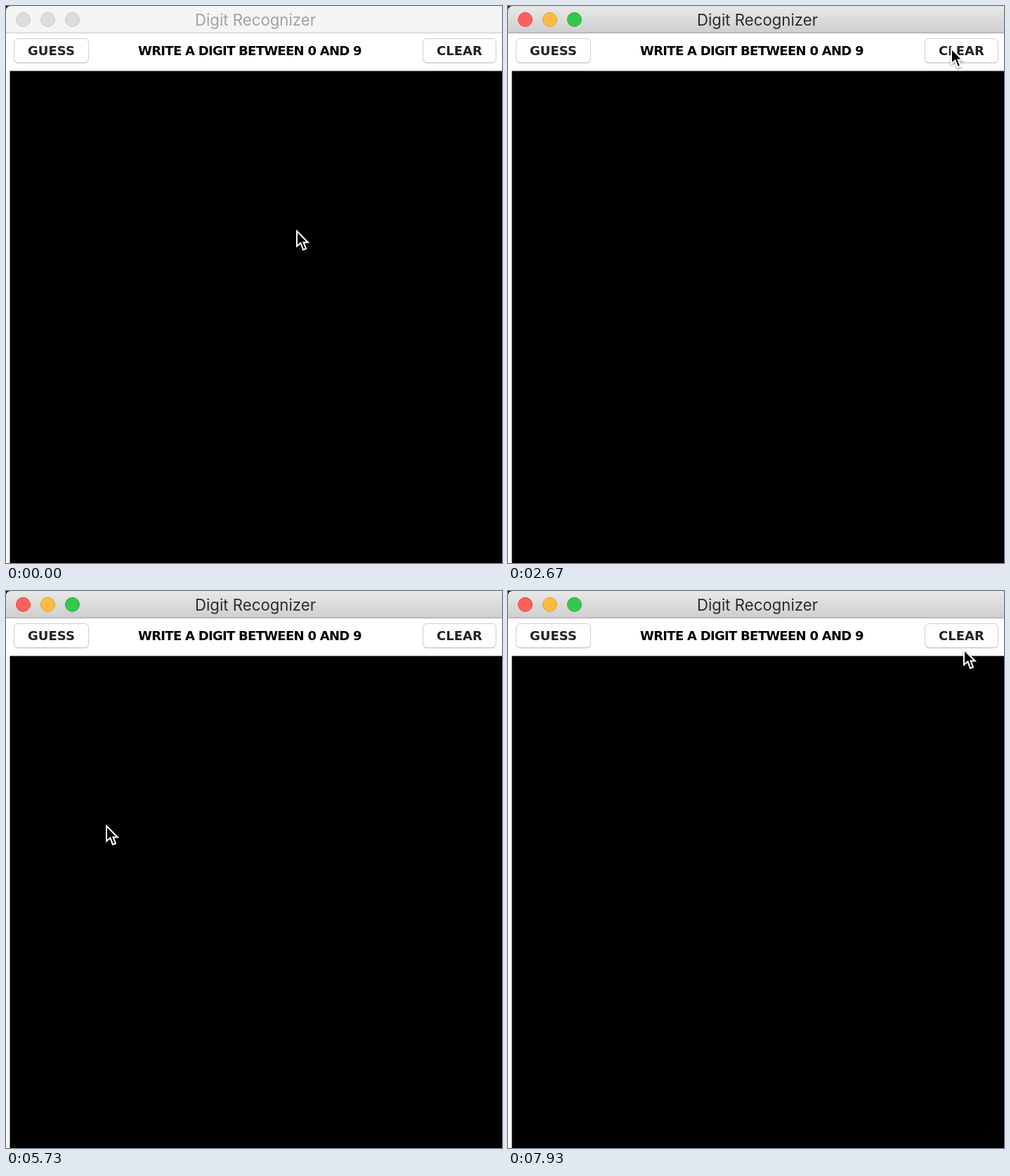
Recreate the animation shown at these times as an HTML page. Size 706 px wide and 793 px high, loop 8 s.

```html
<!DOCTYPE html>
<html lang="en">
<head>
<meta charset="utf-8">
<title>Digit Recognizer</title>
<style>
  html, body { margin: 0; width: 100%; height: 100%; overflow: hidden; background: #fff; }
  svg { display: block; width: 706px; height: 793px; }
  text { text-anchor: middle; }
  .title { font: 22.2px Inter, "Liberation Sans", sans-serif; }
  .bold { font: 700 18px "DejaVu Sans", sans-serif; }
  .tight { letter-spacing: -.72px; }
  .ink { fill: none; stroke: #fff; stroke-width: 26; stroke-linecap: round; stroke-linejoin: round; }
</style>
</head>
<body>
<svg viewBox="0 0 706 793">
  <defs>
    <linearGradient id="bar" x2="0" y2="1">
      <stop stop-color="#e8e8e8"/>
      <stop offset="1" stop-color="#cfcfcf"/>
    </linearGradient>
    <filter id="shade" x="-50%" y="-50%" width="200%" height="200%">
      <feDropShadow dx="0" dy="2" stdDeviation="1.5" flood-opacity=".4"/>
    </filter>
  </defs>
  <rect width="706" height="793" fill="#fff"/>
  <rect width="8" height="8" fill="#111"/>
  <path id="head" d="M0 38V7Q0 0 7 0H706V38Z"/>
  <rect id="rule" y="37.5" width="706" height="1.5"/>
  <g id="lights"></g>
  <text id="title" class="title" x="355" y="28">Digit Recognizer</text>
  <g id="buttons"></g>
  <text class="bold tight" x="347" y="70">WRITE A DIGIT BETWEEN 0 AND 9</text>
  <rect x="5.5" y="92.5" width="701" height="701"/>
  <g id="board" class="ink"></g>
  <path id="cursor" d="M1 2.5V24L6.5 19.5L10 29L14 27.5L10.5 18.5H16.8Z"
        stroke="#fff" stroke-width="2" filter="url(#shade)"/>
</svg>
<script>
const NS = 'http://www.w3.org/2000/svg';
const FPS = 15, LOOP = 8000;
const GUESS = [77, 63], CLEAR = [630, 58];
const $ = id => document.getElementById(id);

function add(parent, tag, attrs, label = '') {
  const el = document.createElementNS(NS, tag);
  for (const key in attrs) el.setAttribute(key, attrs[key]);
  el.textContent = label;
  return parent.appendChild(el);
}

const lamps = [['#fc605b', '#e2463f'], ['#fdbc40', '#dfa034'], ['#34c84a', '#28ac35']];
const lights = lamps.map((_, i) => add($('lights'), 'circle', { cx: 24.5 + i * 35, cy: 19.3, r: 10 }));

function button(x, w, label) {
  const box = { x: x + .5, width: w - 1, height: 34, rx: 5.5 };
  add($('buttons'), 'rect', { ...box, y: 47.5, fill: '#c2c2c2' });
  add($('buttons'), 'rect', { ...box, y: 46.5, fill: '#fff', stroke: '#cecece' });
  add($('buttons'), 'text', { class: 'bold', x: x + w / 2, y: 70, fill: '#222' }, label);
}
button(11, 107, 'GUESS');
button(593, 105, 'CLEAR');

// Times are ticks of 1/15 s: pen down, pen up, setting off for each button.
const digits = [
  { down: 3, up: 14, guess: 19, clear: 35, rest: [350, 240],
    d: 'M372 267C425 303 453 350 453 432C453 540 412 590 355 619H330' +
       'C250 612 197 560 197 490C197 390 245 320 337 233L346 232' },
  { down: 50, up: 57, guess: 58, clear: 73, rest: [83, 389],
    d: 'M46 172Q65 157 90 156V267L85 356V375L83 389' },
  { down: 86, up: 97, guess: 98, clear: 112, rest: [493, 594],
    d: 'M142 332L143 342V328C180 270 252 222 315 218H340L373 221L377 242L374 300L342 373' +
       'C300 445 232 545 232 597V616L238 627L263 637L307 638C385 638 430 602 493 594' }
];

const ease = u => u * u * (3 - 2 * u);
const travelTime = (a, b) => 2.5 + Math.hypot(b[0] - a[0], b[1] - a[1]) / 600;

// Cursor trips between pen strokes, in order of time.
const trips = [];
function trip(from, to, leave, time = travelTime(from, to)) {
  trips.push({ from, to, leave, time });
}

let last = [413, 318];
for (const digit of digits) {
  digit.ink = add($('board'), 'path', { d: digit.d });
  digit.length = digit.ink.getTotalLength();
  const start = digit.ink.getPointAtLength(0);
  const first = [start.x, start.y];
  trip(last, first, digit.down - travelTime(last, first));
  trip(digit.rest, GUESS, digit.guess);
  trip(GUESS, CLEAR, digit.clear);
  last = CLEAR;
}
trip(CLEAR, [648, 81], 116);

function cursorAt(tick) {
  for (const { down, up, ink, length } of digits) {
    if (tick > down && tick < up) {
      const p = ink.getPointAtLength(length * (tick - down) / (up - down));
      return [p.x, p.y];
    }
  }
  // After a stroke the cursor waits where its next trip begins.
  const waiting = digits.find(d => tick >= d.up && tick < d.guess);
  if (waiting) return waiting.rest;
  const { from, to, leave, time } = trips.findLast(t => tick >= t.leave) || trips[0];
  const u = ease(Math.max(0, Math.min(1, (tick - leave) / time)));
  return from.map((v, i) => v + (to[i] - v) * u);
}

function render(ms) {
  const tick = Math.floor((ms + 5) * FPS / 1000);
  const active = tick >= 1;
  $('head').setAttribute('fill', active ? 'url(#bar)' : '#f6f5f5');
  $('rule').setAttribute('fill', active ? '#b0b0b0' : '#d6d6d6');
  $('title').setAttribute('fill', active ? '#2c2c2c' : '#a2a2a2');
  lights.forEach((el, i) => {
    const [fill, edge] = active ? lamps[i] : ['#dddddd', '#c8c8c8'];
    el.setAttribute('fill', fill);
    el.setAttribute('stroke', edge);
  });

  for (const { down, up, clear, ink, length } of digits) {
    const shown = tick > down && tick < clear + 4;
    const done = Math.min(1, (tick - down) / (up - down));
    ink.setAttribute('visibility', shown ? 'visible' : 'hidden');
    ink.setAttribute('stroke-dasharray', done < 1 ? `${Math.max(0, length * done)} ${length * 2}` : 'none');
  }
  $('cursor').setAttribute('transform', `translate(${cursorAt(tick)})`);
}

const began = performance.now();
function loop() {
  render((performance.now() - began) % LOOP);
  requestAnimationFrame(loop);
}
loop();
</script>
</body>
</html>
```
